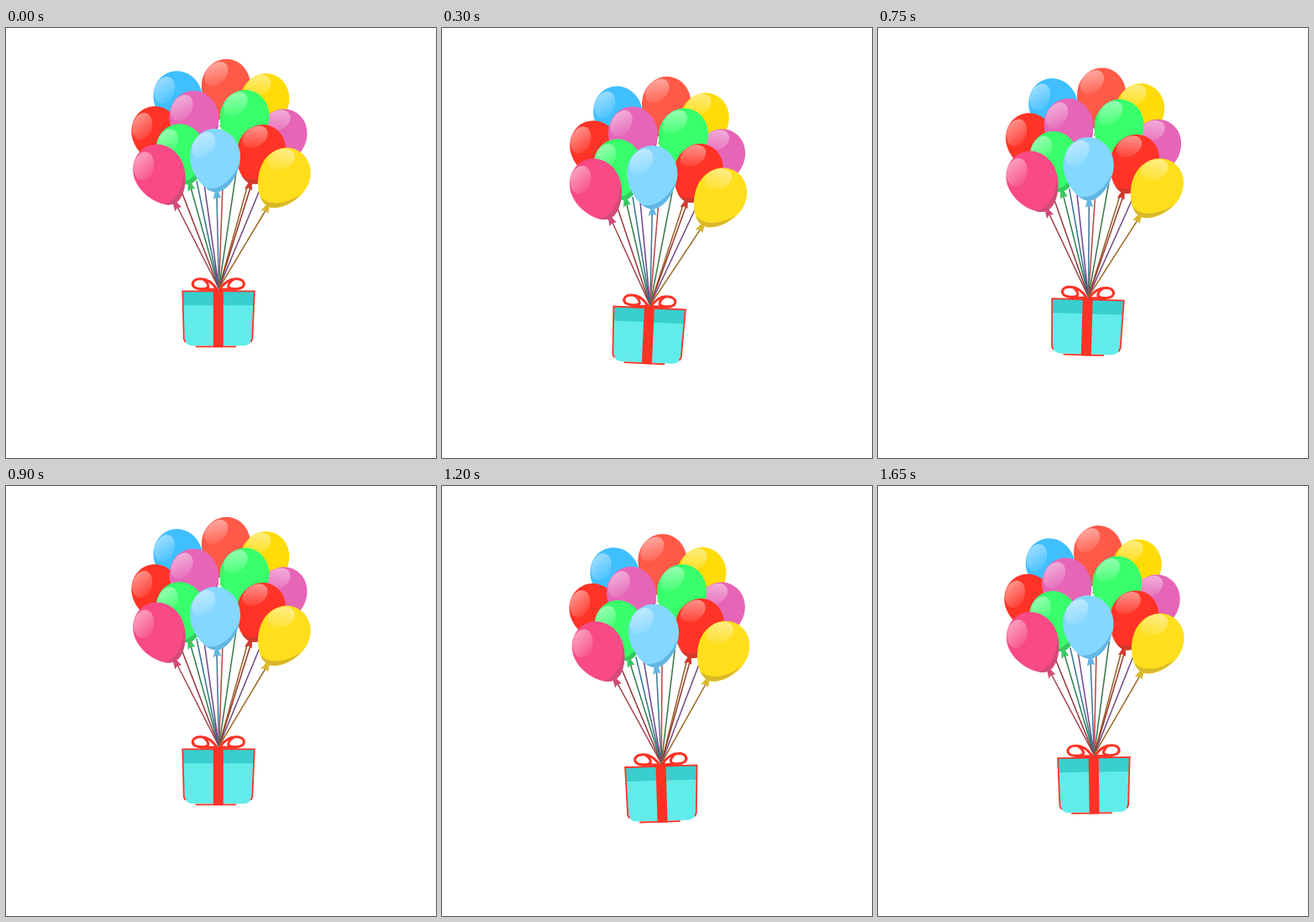
Animation of 512 by 512 pixels, one loop 1800 ms. Source, as an HTML page:

```html
<!DOCTYPE html>
<html>
<head>
<meta charset="utf-8">
<style>
  html, body { margin: 0; width: 100%; height: 100%; overflow: hidden; background: #fff; }
  svg { display: block; width: 100vw; height: 100vh; }
</style>
</head>
<body>
<svg viewBox="0 0 512 512">
  <defs>
    <linearGradient id="gloss" x1="0" y1="0" x2="1" y2="1">
      <stop offset="0" stop-color="#fff" stop-opacity=".55"/>
      <stop offset="1" stop-color="#fff" stop-opacity="0"/>
    </linearGradient>
  </defs>
  <g id="bunch">
    <g transform="translate(-.7 .3)">
      <path fill="#61ecea" d="M212 329H295L294 368Q293 378 283 378H223Q214 378 213 368Z"/>
      <path fill="#38cfce" d="M211 313H296V330H212Z"/>
      <g fill="none" stroke="#ff3226" stroke-linecap="round">
        <path stroke-width="1.800" d="M214 373L212.500 370L211 313H296.500L294 370L292.500 373M227 379H274"/>
        <path stroke-width="12" stroke-linecap="butt" d="M253.500 311V380"/>
        <path id="bow" stroke-width="3" d="M252 311C246 302 238 298 231 298.500C223 299 221 305 225 308.500C230 311.500 239 311 241.500 308C242 305 239 301 236 299.500M232 311H250"/>
        <use href="#bow" transform="matrix(-1 0 0 1 507 0)"/>
      </g>
    </g>
    <g id="strings" stroke-width="1.500"></g>
    <g id="balloons"></g>
  </g>
</svg>
<script>
const find = id => document.getElementById(id);

// x, y of the upper end, colour
const strings = [
  [204, 213, '#a4434c'], [208, 192, '#97343a'], [220, 190, '#2f7d4c'],
  [227, 182, '#31758d'], [236, 186, '#70438c'], [251, 200, '#3d7699'],
  [258, 188, '#b94740'], [274, 172, '#39764a'], [287, 190, '#936022'],
  [291, 190, '#98382d'], [302, 193, '#724983'], [311, 214, '#9c6820']
];
find('strings').innerHTML = strings.map(([x, y, color]) =>
  `<path stroke="${color}" d="M${x} ${y}L253.500 310"/>`).join('');

// x, y, tilt, scale, body, shade; back to front
const balloons = [
  [205, 83, -18, .97, '#40bfff', '#2b9fe2'],
  [262, 69, 4, .97, '#ff5947', '#e04538'],
  [308, 86, 18, .97, '#ffdc08', '#dcb81a'],
  [179, 125, -22, .97, '#ff3326', '#d62a24'],
  [329, 128, 24, .97, '#e665b7', '#c64e9e'],
  [224, 107, -8, .98, '#e665b7', '#c64e9e'],
  [284, 106, 8, .98, '#38ff6b', '#2fd058'],
  [208, 146, -15, .97, '#38ff6b', '#37c960'],
  [304, 146.5, 19, .96, '#ff3326', '#d13a2c'],
  [249, 153, -2.5, 1, '#84d7ff', '#62b6e4'],
  [182, 171, -27, 1, '#f84a86', '#d24b77'],
  [332, 175, 29, 1, '#ffde1c', '#d9b82a']
];
find('balloons').innerHTML = balloons.map(([x, y, tilt, scale, body, shade]) => `
  <g transform="translate(${x} ${y}) rotate(${tilt}) scale(${scale})">
    <path fill="${shade}" d="M-2 41H2L5 50L0 48.500L-4.500 51Z"/>
    <path fill="${body}" d="M-30 0C-30 -18 -17 -33 0 -33S30 -18 30 0C30 20 14 42.500 0 42.500S-30 20 -30 0Z"/>
    <path fill="${shade}" d="M28.500 10C24 28 11 42.500 0 42.500C-5 42.500 -9 40 -13 37C3 42 19 29 28.500 10Z"/>
    <ellipse cx="-13" cy="-14" rx="12" ry="17" transform="rotate(38 -13 -14)" fill="url(#gloss)"/>
  </g>`).join('');

// Each sway goes down three steps and back up: [angle, drift] per step
const sways = [
  [[0, 0], [1.7, 1.2], [2.6, .6], [3.4, 0]],
  [[0, 0], [-.87, 1.7], [-1.7, 3.5], [-2.55, 2.8]]
];

function draw() {
  const tick = Math.floor(performance.now() % 1800 / 150);
  const step = 3 - Math.abs(tick % 6 - 3);
  const [angle, drift] = sways[tick < 6 ? 0 : 1][step];
  find('bunch').setAttribute('transform',
    `translate(${drift} ${step * 10.2}) rotate(${angle} 256 170)`);
  requestAnimationFrame(draw);
}
draw();
</script>
</body>
</html>
```
